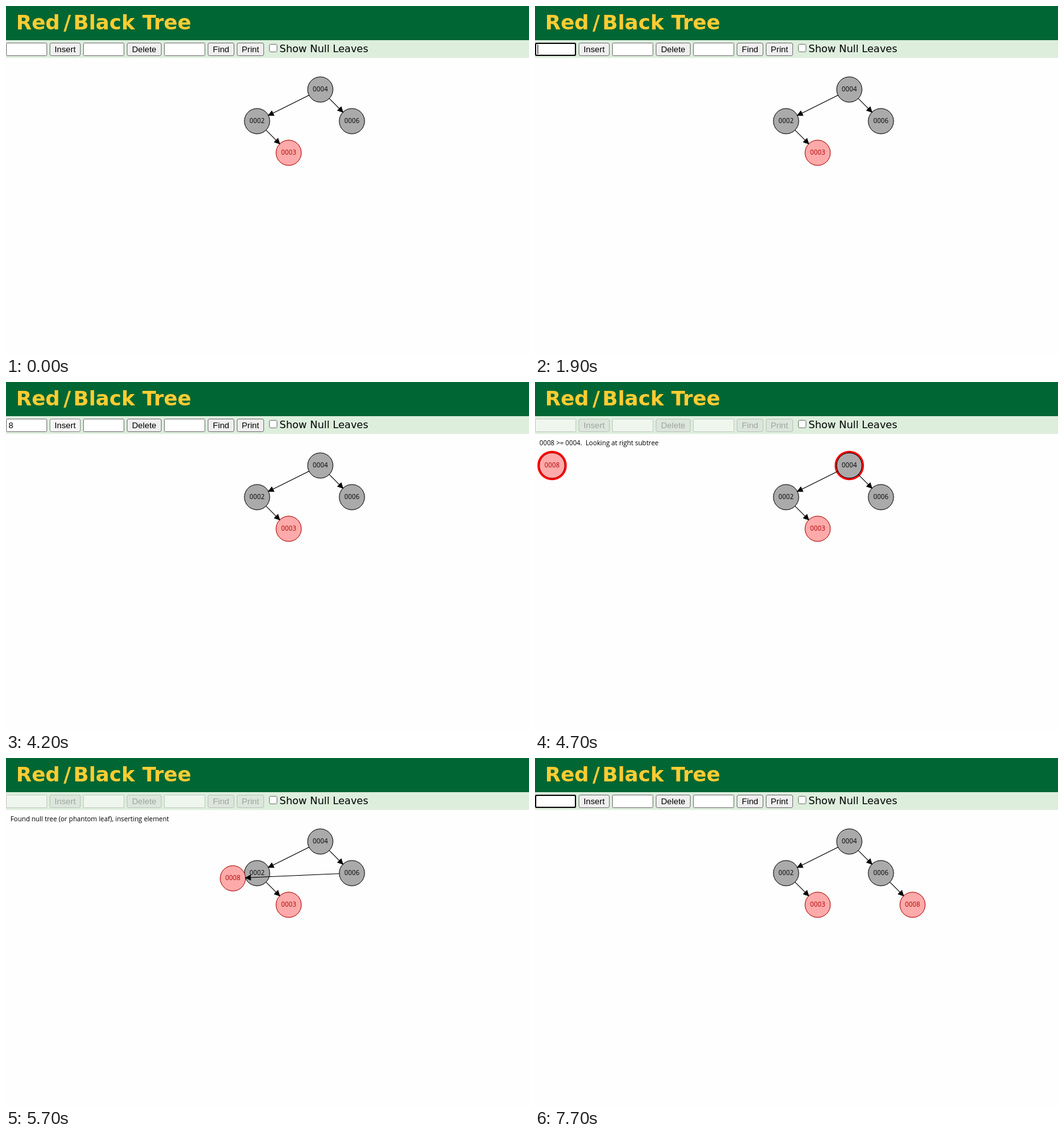
Animation of 827x550 px, one loop 8 s. Source, as an HTML page with a canvas:

```html
<!DOCTYPE html>
<html lang="en">
<head>
<meta charset="utf-8">
<title>Red/Black Tree</title>
<style>
  html, body { margin: 0; width: 100%; height: 100%; overflow: hidden; background: #fefefe; }
  canvas { display: block; }
</style>
</head>
<body>
<canvas id="stage" width="827" height="550"></canvas>
<script>
const ctx = document.getElementById('stage').getContext('2d');
const LOOP = 8000, STEP = 100, R = 20;
const VERDANA = '"DejaVu Sans", sans-serif';
const SMALL = '10.4px "Open Sans", "Noto Sans", sans-serif';
const ARIAL = '13.333px "Liberation Sans", Arial, sans-serif';

const BLACK = { fill: '#aaaaaa', ink: '#000000' };
const RED = { fill: '#ffaaaa', ink: '#aa0000' };
const n4 = { x: 497, y: 132, label: '0004', ...BLACK };
const n2 = { x: 397, y: 182, label: '0002', ...BLACK };
const n6 = { x: 547, y: 182, label: '0006', ...BLACK };
const n3 = { x: 447, y: 232, label: '0003', ...RED };
const START = { x: 27, y: 132 }, GOAL = { x: 597, y: 232 };

const BUTTONS = [['Insert', 69, 49], ['Delete', 191, 55], ['Find', 319, 42], ['Print', 365, 43]];

const between = (t, from, to) => t >= from && t < to;
const mix = (a, b, p) => ({ x: a.x + (b.x - a.x) * p, y: a.y + (b.y - a.y) * p });

function text(str, x, y, font, color, align = 'left') {
  ctx.font = font;
  ctx.fillStyle = color;
  ctx.textAlign = align;
  ctx.fillText(str, x, y);
}

function box(x, y, w, h, radius, fill, stroke, line = 1) {
  ctx.beginPath();
  ctx.roundRect(x + line / 2, y + line / 2, w - line, h - line, radius);
  ctx.fillStyle = fill;
  ctx.fill();
  ctx.strokeStyle = stroke;
  ctx.lineWidth = line;
  ctx.stroke();
}

function circle(c, r) {
  ctx.beginPath();
  ctx.arc(c.x, c.y, r, 0, 2 * Math.PI);
}

function drawNode(n, glow) {
  if (glow) {
    circle(n, R + glow);
    ctx.fillStyle = '#ff0000';
    ctx.fill();
  }
  circle(n, R);
  ctx.fillStyle = n.fill;
  ctx.fill();
  ctx.strokeStyle = n.ink;
  ctx.lineWidth = 1;
  ctx.stroke();
  text(n.label, n.x, n.y + 3, SMALL, n.ink, 'center');
}

function drawEdge(a, b) {
  const len = Math.hypot(b.x - a.x, b.y - a.y);
  ctx.save();
  ctx.translate(a.x, a.y);
  ctx.rotate(Math.atan2(b.y - a.y, b.x - a.x));
  ctx.strokeStyle = ctx.fillStyle = '#000';
  ctx.lineWidth = 1;
  ctx.beginPath();
  ctx.moveTo(R, 0);
  ctx.lineTo(len - R, 0);
  ctx.stroke();
  ctx.beginPath();
  ctx.moveTo(len - R, 0);
  ctx.lineTo(len - R - 8, -4);
  ctx.lineTo(len - R - 8, 4);
  ctx.closePath();
  ctx.fill();
  ctx.stroke();
  ctx.restore();
}

function drawHeader() {
  ctx.fillStyle = '#006633';
  ctx.fillRect(0, 0, 827, 54);
  ctx.fillStyle = '#ddeedd';
  ctx.fillRect(0, 54, 827, 28);
  const bold = 'bold 32px ' + VERDANA;
  [['Red', 16], ['/', 91], ['Black', 106.5], ['Tree', 215.5]]
    .forEach(([word, x]) => text(word, x, 37, bold, '#ffcc33'));
}

function drawControls(t) {
  const disabled = between(t, 4300, 6300);
  const focused = between(t, 1900, 4200) || t >= 7200;
  const hoverField = between(t, 1000, 1900) || between(t, 7100, 7200);
  const border = disabled ? 'rgba(118,118,118,.3)' : '#767676';

  for (const x of [0, 122, 250]) {
    const edge = hoverField && x === 0 ? '#4f4f4f' : border;
    box(x, 58, 65, 21, 1, disabled ? 'rgba(255,255,255,.5)' : '#fff', edge);
  }
  if (focused) box(0, 58, 65, 21, 2, '#fff', '#101010', 2);

  const typed = between(t, 3300, 4300);
  if (typed) text('8', 4, 73, ARIAL, '#000');
  const caret = between(t, 1900, 2400) || between(t, 2900, 3800) || between(t, 7200, 7700);
  if (caret) {
    ctx.fillStyle = '#000';
    ctx.fillRect(typed ? 11 : 4, 61, 1, 15);
  }

  for (const [label, x, w] of BUTTONS) {
    let fill = disabled ? '#dce6dc' : '#efefef', edge = border;
    if (label === 'Insert' && between(t, 4000, 4200)) [fill, edge] = ['#e5e5e5', '#4f4f4f'];
    if (label === 'Insert' && between(t, 4200, 4300)) [fill, edge] = ['#f5f5f5', '#8d8d8d'];
    box(x, 58, w, 21, 2.5, fill, edge);
    text(label, x + w / 2, 73, ARIAL, disabled ? 'rgba(16,16,16,.3)' : '#000', 'center');
  }

  box(416, 60, 13, 13, 2, '#fff', '#767676');
  text('Show Null Leaves', 432.5, 73, '16px ' + VERDANA, '#000');
}

function message(t) {
  if (!between(t, 4300, 6300)) return '';
  if (t < 4600) return 'Inserting 0008';
  if (t < 5300) return '0008 >= 0004.  Looking at right subtree';
  if (t < 5600) return '0008 >= 0006.  Looking at right subtree';
  return 'Found null tree (or phantom leaf), inserting element';
}

function drawTree(t) {
  const pulse = 3 + Math.abs(t - 4760) / 233;
  const first = between(t, 4600, 5000), second = between(t, 5300, 5600);

  drawNode(n4, first && pulse);
  drawNode(n2);
  drawNode(n6, second && pulse);
  drawNode(n3);

  let added;
  if (t >= 4300) {
    const progress = t < 5700 ? 0 : [0.582, 0.851][(t - 5700) / STEP] ?? 1;
    added = { ...mix(START, GOAL, progress), label: '0008', ...RED };
    drawNode(added, (first || second) && pulse);
  }

  drawEdge(n4, n2);
  drawEdge(n4, n6);
  drawEdge(n2, n3);
  if (t >= 5600) drawEdge(n6, added);

  if (between(t, 5000, 5300)) {
    circle(mix(n4, n6, 0.92 - 0.27 * (5200 - t) / STEP), R);
    ctx.strokeStyle = '#007700';
    ctx.lineWidth = 4;
    ctx.stroke();
  }
  text(message(t), 7, 100, SMALL, '#000');
}

function frame(now) {
  const t = Math.floor((now % LOOP) / STEP) * STEP;
  ctx.fillStyle = '#fefefe';
  ctx.fillRect(0, 0, 827, 550);
  drawHeader();
  drawControls(t);
  drawTree(t);
  requestAnimationFrame(frame);
}
frame(0);
</script>
</body>
</html>
```
